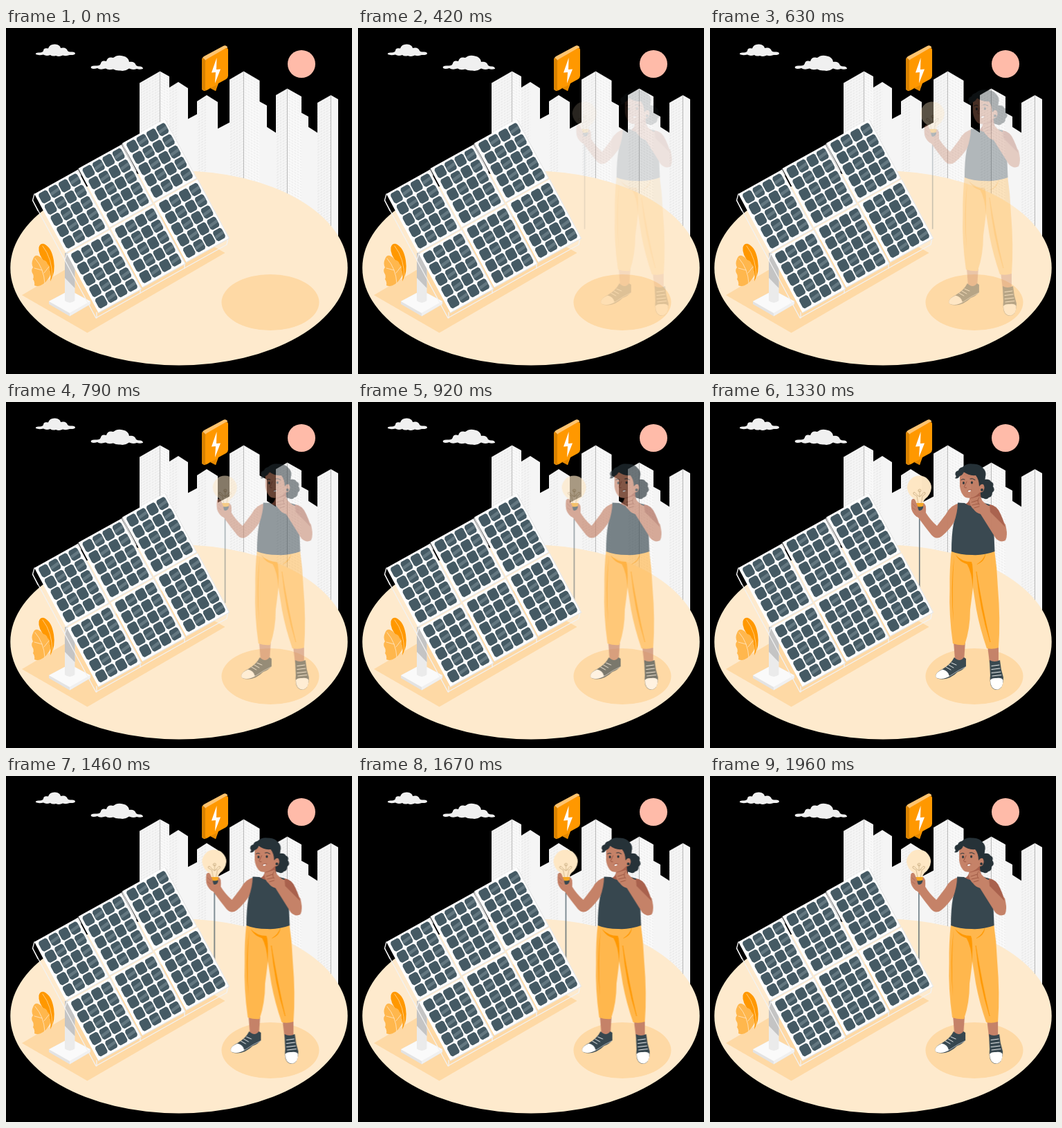
Animation of 500x500 px, one loop 2 s. Source, as an HTML page without scripts:

```html
<!DOCTYPE html>
<html lang="en">
<head>
<meta charset="utf-8">
<title>Solar energy</title>
<style>
html, body { margin: 0; width: 100%; height: 100%; overflow: hidden; background: #000; }
svg { display: block; width: 100vw; height: 100vh; }
.person { animation: arrive 2s cubic-bezier(.36, -.01, .5, 1.38) infinite; }
@keyframes arrive {
  from { opacity: 0; transform: translateX(29.5px); }
  to { opacity: 1; transform: translateX(-.5px); }
}
.line { fill: none; stroke-linecap: round; stroke-linejoin: round; }
.skin { fill: #c58268; }
.shade { fill: #a9614d; }
.dark { fill: #37474f; }
.hair { fill: #263238; }
.pants { fill: #ffb74d; }
.fold { fill: #ff9800; }
.white { fill: #fff; }
</style>
</head>
<body>
<svg viewBox="0 0 500 500">
<defs>
  <pattern id="winL" width="4.2" height="4" patternUnits="userSpaceOnUse" patternTransform="skewY(-29)">
    <rect width="4.2" height="4" fill="#f6f6f6"/>
    <rect x=".6" y=".8" width="2.8" height="1.7" fill="#e8e8e8"/>
  </pattern>
  <pattern id="winR" width="4.2" height="4" patternUnits="userSpaceOnUse" patternTransform="skewY(29)">
    <rect width="4.2" height="4" fill="#fafafa"/>
    <rect x=".6" y=".8" width="2.8" height="1.7" fill="#ededed"/>
  </pattern>

  <!-- one unit per cell, skewed into place by each module -->
  <path id="cell" d="M-.28-.44H.28Q.36-.44 .44-.28V.28Q.36.44 .28.44H-.28Q-.36.44-.44.28V-.28Q-.36-.44-.28-.44Z" fill="#455a64"/>
  <g id="shiny">
    <use href="#cell"/>
    <path d="M-.44-.04L.44-.14V.1L-.44.2Z" fill="#637780"/>
  </g>
  <g id="cells">
    <use href="#cell"/><use href="#shiny" x="1"/><use href="#cell" x="2"/><use href="#shiny" x="3"/>
  </g>
  <g id="module">
    <rect x="-.68" y="-.6" width="4.33" height="5.26" fill="#fff"/>
    <path d="M-.68 4.64H3.62V-.6" fill="none" stroke="#e3e3e3" stroke-width=".06"/>
    <use href="#cells"/><use href="#cells" y="1"/><use href="#cells" y="2"/>
    <use href="#cells" y="3"/><use href="#cells" y="4"/>
  </g>
  <g id="column">
    <use href="#module" transform="matrix(14.4 -8 8.7 16.25 56 244)"/>
    <use href="#module" transform="matrix(14.4 -8 8.7 16.25 103 330.7)"/>
  </g>
</defs>

<rect width="500" height="500"/>

<!-- sky -->
<circle cx="427" cy="52" r="20" fill="#ffbba9"/>
<g fill="#f0f0f0">
  <path d="M43 38Q42 35 49 35.500Q53 35 54 33Q54 28 61 29.500Q63 23 71 23.500Q78 24 79 29Q87 27 89 33Q91 35 94 34.500Q100 34 100 37Q99 39.500 92 39Q87 41 82 39.500Q77 42 72 40Q67 41.500 64 39Q58 41 54 38.500Q47 40 43 38Z"/>
  <path d="M123 58Q121 54 130 54.500Q136 55 137 51Q138 46 145 48Q147 41 155 43Q161 38 169 40.500Q177 42 178 49Q186 48 188 54Q191 56 194 55.500Q198 56 198 59Q193 60.500 189 59Q183 61 178 58.500Q172 63 165 61.500Q159 62 155 59.500Q148 61.500 144 58.500Q136 61 132 58Q126 60 123 58Z"/>
</g>

<!-- city -->
<g fill="#f5f5f5">
  <path d="M262 132L277 124V300H262Z"/>
  <path d="M305 146L324 136V300H305Z"/>
  <path d="M366 106L377 112V143L391 152V300H366Z"/>
  <path d="M426 122L437 128V143L451 152V320H426Z"/>
</g>
<g fill="url(#winL)">
  <path d="M193 79.500L222.500 62.500V260H193Z"/>
  <path d="M236 86L249 78V300H236Z"/>
  <path d="M276 106L290 97V300H276Z"/>
  <path d="M323 74.500L343.500 62.500V300H323Z"/>
  <path d="M390 97L406.500 87.500V300H390Z"/>
  <path d="M450 108L469.500 97V320H450Z"/>
</g>
<g fill="url(#winR)">
  <path d="M222.500 62.500L236 70V260H222.500Z"/>
  <path d="M343.500 62.500L366.500 76V300H343.500Z"/>
  <path d="M406.500 87.500L427 99V300H406.500Z"/>
</g>
<g fill="#f5f5f5">
  <path d="M249 78L263 87V300H249Z"/>
  <path d="M290 97L306 107V300H290Z"/>
  <path d="M469.500 97L480 103V320H469.500Z"/>
</g>

<!-- ground -->
<ellipse cx="250" cy="346.800" rx="243.700" ry="140.600" fill="#feeacd"/>
<path d="M23 386L117.500 440.500L316.500 325L220 270Z" fill="#fed9a5"/>
<ellipse cx="382" cy="396.500" rx="70.500" ry="40.500" fill="#fed9a5"/>

<!-- energy bubble -->
<path d="M283 47Q283 43 286 41L314 26Q318 24 320.500 28L288 48V90.500Q283 91 283 87Z" fill="#ffc470"/>
<path d="M283 46Q283 43.500 284.500 43L288.500 46.500V91Q283 91 283 87Z" fill="#d98200"/>
<path d="M288 49Q288 46 291 44.500L317 29.500Q321 27.500 321 32V69Q321 72 318 74L307 80L303 91L296 86.500L291 89.500Q288 91.500 288 88Z" fill="#ff9800"/>
<path d="M295 87L303 91L305 82Z" fill="#e68900"/>
<path d="M304.500 43L297 64.500L303 64L302 80L310 59.500L304 60Z" class="white"/>

<!-- plant -->
<path d="M64 366Q67 352 57 340Q46 327 47.500 317Q49 311 55 312Q66 317 69 336Q71.500 353 65 364Z" fill="#ff9800"/>
<path d="M53 315Q67 333 67 361" class="line" stroke="#ffd9a0" stroke-width=".8"/>
<path d="M41 372Q42 367 39 363Q41 358 38 354Q36 349 39 346Q36 340 39 334Q41 328 46 329Q51 331 53 335Q59 336 60 341Q64 344 63 350Q66 355 62 361Q57 369 50 372Q45 374 41 372Z" fill="#ffb74d"/>
<path d="M42 333Q55 348 56 369M41 347L52 350M62 345L55 354" class="line" stroke="#ffe8c7" stroke-width=".8"/>

<!-- pole -->
<path d="M62 395L92 379L122 395V399L92 416.500L62 399Z" fill="#e3e3e3"/>
<path d="M92 412L122 395V399L92 416.500Z" fill="#f0f0f0"/>
<path d="M62 395L92 379L122 395L92 412Z" fill="#fafafa"/>
<path d="M85 325H99.500V394Q92 400 85 394Z" fill="#ebebeb"/>
<path d="M85 325H99.500V376L85 361Z" fill="#c4c4c4"/>

<g class="person">
  <path d="M302.800 154V290" class="line" stroke="#455a64" stroke-width="1.300"/>

  <!-- far arm -->
  <path d="M403 148Q415 149 420 162Q427 177 429 190L415 185Q404 168 403 148Z" class="shade"/>

  <!-- ankles and shoes -->
  <path d="M352 346H369L367 375Q360 379 354 372Z" class="skin"/>
  <path d="M401 352H417L417 378Q410 381 404 377Z" class="skin"/>
  <path d="M353 369Q361 377 367 369L370 371V382Q366 387 358 390Q348 400 336 400.500Q327 400.500 326 396Q327 390 336 386Q348 379 353 369Z" class="dark"/>
  <path d="M326 396Q327 390 336 386.500Q344 388 346 396Q340 400 334 400Q327 400 326 396Z" class="white"/>
  <path d="M327 398Q340 401 349 394.500Q358 388 369 383" class="line" stroke="#fff" stroke-width=".6"/>
  <path d="M341 383L348 387M345 380L352 384M349 377L356 380" class="line" stroke="#fff" stroke-width=".9"/>
  <path d="M404 373Q411 377 419 373Q420 386 424 398Q424 412 418 415Q410 418 406 410Q404 404 405 395Z" class="dark"/>
  <path d="M405 402Q407 398.500 414 399Q422 398 423.500 402Q424 413 416 415.500Q408 416.500 405.500 407Z" class="white"/>
  <path d="M407 381.500L418 380M407 386.500L419 385M407 391.500L420 390M408 396L421 394.500" class="line" stroke="#fff" stroke-width=".9"/>

  <!-- trousers -->
  <path d="M349 214Q380 224 411 213Q415 240 416 268Q420 315 417 355Q409 358 400 356Q390 327 385 300L380 268Q378 285 376 300Q376 328 368 351Q360 352 351 349Q345 307 346.500 270Q346 240 349 214Z" class="pants"/>
  <path d="M355 221Q364 231 378 231L379 235Q363 235 355 221Z" class="fold"/>
  <path d="M371 233L379 234Q381 250 379.500 268Q379 247 371 233Z" class="fold"/>
  <path d="M385 245Q390 300 405 347Q394 300 385 245Z" class="fold" stroke="#ff9800" stroke-width=".6"/>
  <path d="M398 219Q398 230 385 235Q396 228 398 219Z" class="fold"/>
  <path d="M353 222Q349 270 352 318Q347 270 353 222Z" class="fold"/>

  <!-- raised arm -->
  <path d="M362 146Q348 148 341 162L328 179Q318 170 312 160Q313 150 309 146L302 149L297 141Q293 138 291 143Q290 151 292 157Q295 164 301 167Q311 181 320 192Q327 200 335 194Q347 184 355 170Z" class="skin"/>

  <!-- bulb -->
  <path d="M285 124A17.500 17.500 0 1 1 320 124Q319 134 311 140Q308 143 308 148H298Q298 143 295 140Q286 134 285 124Z" fill="#fee7c4"/>
  <path d="M301 147L299 136L294 133Q293 130 296 130.500L300 135M305 147L307 136L311 133Q312 130 309 130.500L305 135M300 135Q303 138 306 135M303 137V128M301 128A2 2 0 1 1 305 128A2 2 0 1 1 301 128" class="line" stroke="#b99b6c" stroke-width=".6"/>
  <path d="M297 146H309L308 152H298Z" fill="#f5a623"/>
  <path d="M297 150Q303 153 309 150L307 155Q303 159 299 155Z" class="dark"/>
  <path d="M291 143Q292 138 296 141L300 150Q301 158 305 161L299 166Q293 161 291.500 155Z" class="skin"/>
  <path d="M308 147Q312 147 312 153L311 161L306 159Q309 154 308 147Z" class="skin"/>
  <path d="M293 147L297 151M293 153L297 156" class="line" stroke="#a9614d" stroke-width=".7"/>

  <!-- bun, neck, top -->
  <path d="M390 108L397 112Q404 111 406 115Q411 117 409 122Q413 127 408 131Q408 137 403 138Q400 142 395 139Q391 139 389 134Z" class="hair"/>
  <path d="M376 130L391 128Q390 139 396 148Q384 160 367 148Q377 146 376 130Z" class="shade"/>
  <path d="M358 145.500L368 146Q380 155 393 145L404 148Q403 162 409 174Q411 195 411.500 216Q395 222 379 221Q361 221 349 216Q349 192 352 176Q358 160 358 145.500Z" class="dark"/>

  <!-- face -->
  <path d="M361 107Q369 97 381 100L391 111Q393 118 391 130Q386 137 378 138.500Q370 140 366 135Q362 130 361 122Z" class="skin"/>
  <path d="M378 138.500Q386 136 391 129L390 145Q381 146 377 139Z" class="shade"/>
  <path d="M354 110Q357 108 354.500 105Q354 100 359 99Q360 95 365 94Q371 88 380 89.500Q390 89 395 96Q400 101 398 108Q398 114 394 119L389 122Q389 112 384 106Q374 107 367 101Q365 106 361 107Q358 112 354 110Z" class="hair"/>
  <path d="M389 123Q391 118 395 119Q398 123 395 129Q391 132 388 129Z" class="skin"/>
  <circle cx="393" cy="127" r="1.900" class="hair"/>
  <ellipse cx="366.500" cy="117" rx="1.400" ry="1.900" class="hair"/>
  <ellipse cx="378.500" cy="116.500" rx="1.400" ry="1.900" class="hair"/>
  <path d="M363 112.500Q365 110.500 368 112M376 111Q379 109.500 383 112.500" class="line" stroke="#263238" stroke-width="1"/>
  <path d="M371 115L367.500 122.500Q367.500 124.500 370.500 124" class="line" stroke="#934f3e" stroke-width=".9"/>
  <path d="M372.500 128.500Q375 126.500 377.500 127.500Q377 129.500 374 130Z" class="white"/>
  <path d="M372 128.500Q374.500 126 378 127" class="line" stroke="#8a4637" stroke-width=".7"/>

  <!-- thinking arm -->
  <path d="M375 144Q374 139 379 139L389 136Q392 137 391 140L397 146Q401 150 406 151Q417 164 427 177Q431 193 427 200Q420 204 413 197L391 162Q384 160 381 155Q376 151 375 144Z" class="skin"/>
  <path d="M404 148Q415 150 420 163L427 181L405 159Z" class="shade"/>
  <path d="M378 145L387 142M379 149L388 147M382 153L389 151M389 138Q385 143 389 148" class="line" stroke="#99533f" stroke-width=".8"/>
</g>

<!-- rear frame -->
<g class="line" stroke="#f2f2f2" stroke-width="1.300">
  <path d="M41 240L38.500 249L130 419L194 383L258 347L319 313L321 303"/>
  <path d="M131 411V419M194 376V383M258 340V347M88 326L85 335M38.500 249L46 264"/>
  <path d="M104 205L108 213M168 168L188 207"/>
</g>
<!-- panels -->
<use href="#column"/>
<use href="#column" x="63.500" y="-36.600"/>
<use href="#column" x="127" y="-73.200"/>
</svg>
</body>
</html>
```
